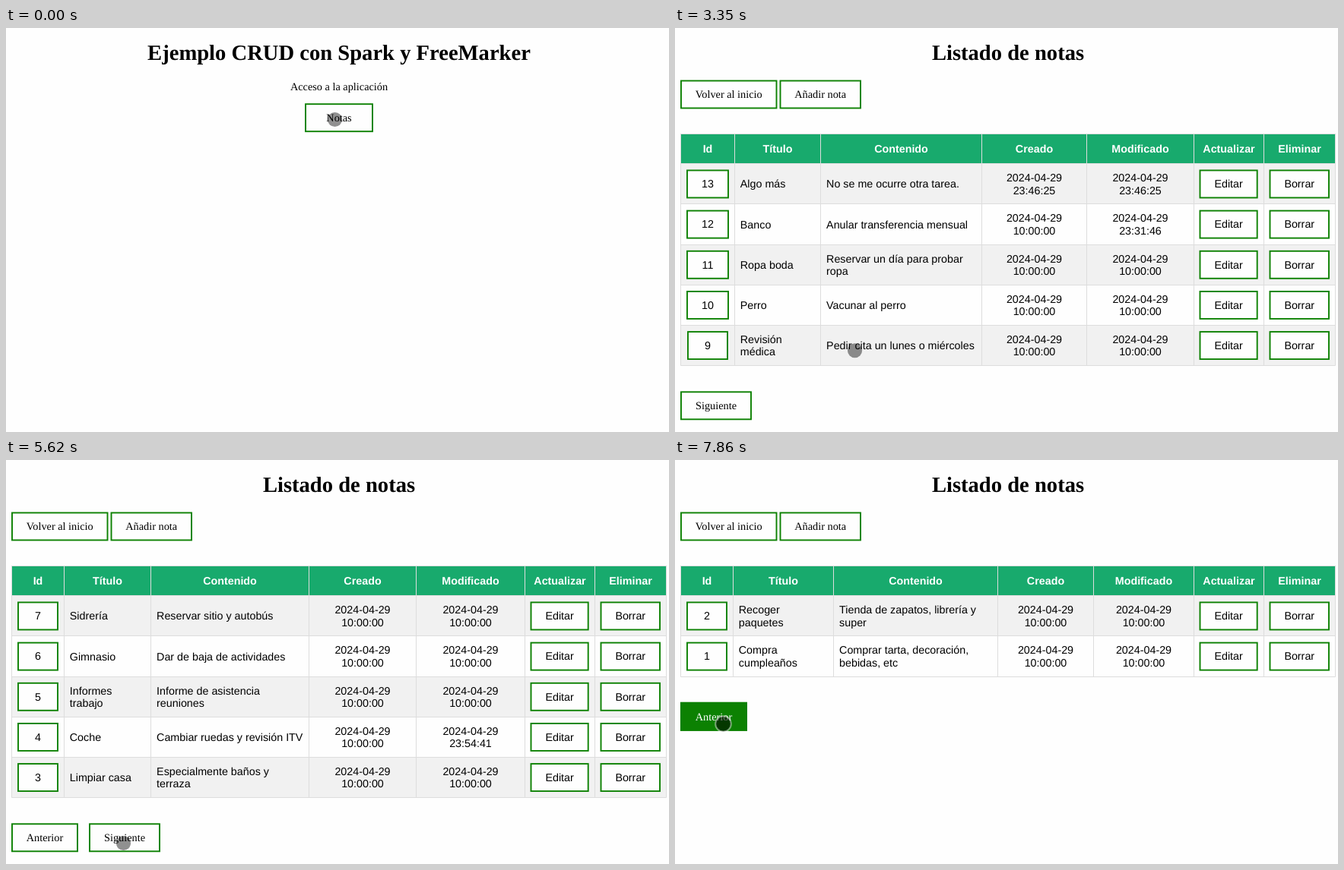
An HTML page that plays this animation: 872 px wide and 532 px high, repeating every 8 s.

```html
<!DOCTYPE html>
<html lang="es">
<head>
<meta charset="utf-8">
<title>Listado de notas</title>
<style>
  html, body { margin: 0; width: 100%; height: 100%; overflow: hidden; background: #fefefe; }
  svg { display: block; width: 872px; height: 532px; }
  text { font: 14.3px "Liberation Serif", Times, serif; text-anchor: middle; text-rendering: geometricPrecision; }
  .title { font-size: 28.6px; font-weight: bold; }
  .table text { font-family: "Liberation Sans", Arial, sans-serif; }
  .table .left { text-anchor: start; }
  .table .head { font-weight: bold; fill: #fff; }
  .line { fill: none; stroke: #ddd; }
  .button rect { fill: #fefefe; stroke: #0c8102; stroke-width: 1.9; }
  .hot rect { fill: #0c8102; }
  .hot text { fill: #fff; }
  .glow { fill: rgba(51, 181, 229, .42); }
  .dot { fill: rgba(0, 0, 0, .43); }
  .pressed .dot { fill: rgba(0, 0, 0, .56); stroke: rgba(255, 255, 255, .45); stroke-width: 2; }
</style>
</head>
<body>
<svg id="stage" viewBox="0 0 872 532"></svg>
<script>
const LOOP = 8000;
const stage = document.getElementById('stage');
const timed = [];

function add(parent, tag, attrs = {}, label) {
  const el = document.createElementNS('http://www.w3.org/2000/svg', tag);
  for (const key in attrs) el.setAttribute(key, attrs[key]);
  if (label !== undefined) el.textContent = label;
  return parent.appendChild(el);
}

function during(el, from, to) {
  timed.push({ el, from, to });
  return el;
}

const text = (parent, x, y, label, cls = '') => add(parent, 'text', { x, y, class: cls }, label);

function button(parent, x, y, width, label, cls = '') {
  const g = add(parent, 'g', { class: 'button ' + cls });
  add(g, 'rect', { x: x + 1, y: y + 1, width: width - 2, height: 36 });
  text(g, x + width / 2, y + 23.8, label);
  return g;
}

// A button that turns green when pressed, then gets the tap highlight.
function tapButton(parent, x, y, width, label, press, glow) {
  button(parent, x, y, width, label);
  during(button(parent, x, y, width, label, 'hot'), press, LOOP);
  during(add(parent, 'rect', { x, y, width, height: 38, class: 'glow' }), glow, LOOP);
}

function page(title, from, to) {
  const g = during(add(stage, 'g'), from, to);
  text(g, 438, 42, title, 'title');
  return g;
}

function cell(g, x, mid, label, cls) {
  const lines = label.split('|');
  lines.forEach((line, i) =>
    text(g, x, mid + 5.1 + (i - (lines.length - 1) / 2) * 16.3, line, cls));
}

const HEADS = ['Id', 'Título', 'Contenido', 'Creado', 'Modificado', 'Actualizar', 'Eliminar'];
const ROW = 53.15, TOP = 178.8;

function listPage(from, to, innerCols, rows) {
  const g = page('Listado de notas', from, to);
  button(g, 7, 68.5, 127.5, 'Volver al inicio');
  button(g, 137.5, 68.5, 107.5, 'Añadir nota');

  const table = add(g, 'g', { class: 'table' });
  const cols = [7.5, ...innerCols, 682.5, 774.5, 868.5];
  const mid = i => (cols[i] + cols[i + 1]) / 2;
  const bottom = Math.floor(TOP + ROW * rows.length) + .5;

  add(table, 'rect', { x: 7.5, y: 139.5, width: 861, height: 39, fill: '#18aa6d' });
  rows.forEach((row, r) => {
    if (r % 2 === 0)
      add(table, 'rect', { x: 7.5, y: TOP + r * ROW, width: 861, height: ROW, fill: '#f1f1f1' });
    add(table, 'path', { class: 'line', d: `M7 ${Math.floor(TOP + r * ROW) + .5}H869` });
  });
  add(table, 'path', { class: 'line', d: `M7.5 139.5H868.5V${bottom}H7.5Z` });
  cols.slice(1, -1).forEach(x => add(table, 'path', { class: 'line', d: `M${x} 139.5V${bottom}` }));

  HEADS.forEach((head, i) => text(table, mid(i), 164.3, head, 'head'));
  rows.forEach(([id, name, body, created = '10:00:00', changed = created], r) => {
    const y = TOP + ROW * (r + .5), top = y - 18.9;
    const w = id > 9 ? 56 : 54;
    button(table, mid(0) - w / 2, top, w, id);
    cell(table, cols[1] + 7.3, y, name, 'left');
    cell(table, cols[2] + 7.6, y, body, 'left');
    cell(table, mid(3), y, '2024-04-29|' + created);
    cell(table, mid(4), y, '2024-04-29|' + changed);
    button(table, 689.5, top, 77.2, 'Editar');
    button(table, 781.5, top, 79.5, 'Borrar');
  });
  return g;
}

const home = page('Ejemplo CRUD con Spark y FreeMarker', 0, 950);
text(home, 438, 81.7, 'Acceso a la aplicación');
tapButton(home, 393, 99.2, 90, 'Notas', 500, 800);

const first = listPage(950, 4430, [78.5, 191.5, 403.5, 541.5], [
  [13, 'Algo más', 'No se me ocurre otra tarea.', '23:46:25'],
  [12, 'Banco', 'Anular transferencia mensual', '10:00:00', '23:31:46'],
  [11, 'Ropa boda', 'Reservar un día para probar|ropa'],
  [10, 'Perro', 'Vacunar al perro'],
  [9, 'Revisión|médica', 'Pedir cita un lunes o miércoles']
]);
tapButton(first, 7, 478.3, 94, 'Siguiente', 4100, 4250);

const second = listPage(4430, 6220, [76.5, 190.5, 398.5, 539.5], [
  [7, 'Sidrería', 'Reservar sitio y autobús'],
  [6, 'Gimnasio', 'Dar de baja de actividades'],
  [5, 'Informes|trabajo', 'Informe de asistencia|reuniones'],
  [4, 'Coche', 'Cambiar ruedas y revisión ITV', '10:00:00', '23:54:41'],
  [3, 'Limpiar casa', 'Especialmente baños y|terraza']
]);
button(second, 7, 478.3, 88, 'Anterior');
tapButton(second, 109, 478.3, 94, 'Siguiente', 5770, 6070);

const third = listPage(6220, LOOP, [76.5, 208.5, 424.5, 550.5], [
  [2, 'Recoger|paquetes', 'Tienda de zapatos, librería y|super'],
  [1, 'Compra|cumpleaños', 'Comprar tarta, decoración,|bebidas, etc']
]);
tapButton(third, 7, 318.8, 88, 'Anterior', 7860, LOOP);

const cursor = add(stage, 'g');
const dot = add(cursor, 'circle', { class: 'dot' });

// The pointer advances in 150 ms ticks, slowing towards each target.
const TICK = 150;
const moves = [
  { at: 3350, ticks: 5, to: [59.5, 499], pow: [3.34, 7.3] },
  { at: 5170, ticks: 4, to: [154.5, 504.5], pow: [1.6, 1.6] },
  { at: 6820, ticks: 7, to: [63.5, 347.5], pow: [1.6, 1.6] }
];
const presses = [[500, 950], [4100, 4430], [5770, 6220], [7860, LOOP]];

function pointerAt(t) {
  let pos = [432.5, 120.5];
  for (const { at, ticks, to, pow } of moves) {
    if (t < at) break;
    const k = Math.min(1, (Math.floor((t - at) / TICK) + 1) / ticks);
    pos = pos.map((p, i) => to[i] + (p - to[i]) * (1 - k) ** pow[i]);
  }
  return pos;
}

function render(t) {
  for (const { el, from, to } of timed)
    el.style.display = t >= from && t < to ? '' : 'none';
  const pressed = presses.some(([from, to]) => t >= from && t < to);
  cursor.setAttribute('class', pressed ? 'pressed' : '');
  cursor.setAttribute('transform', `translate(${pointerAt(t)})`);
  dot.setAttribute('r', pressed ? 10.3 : 9.6);
}

let start;
function frame(now) {
  start ??= now;
  render((now - start) % LOOP);
  requestAnimationFrame(frame);
}
render(0);
requestAnimationFrame(frame);
</script>
</body>
</html>
```
